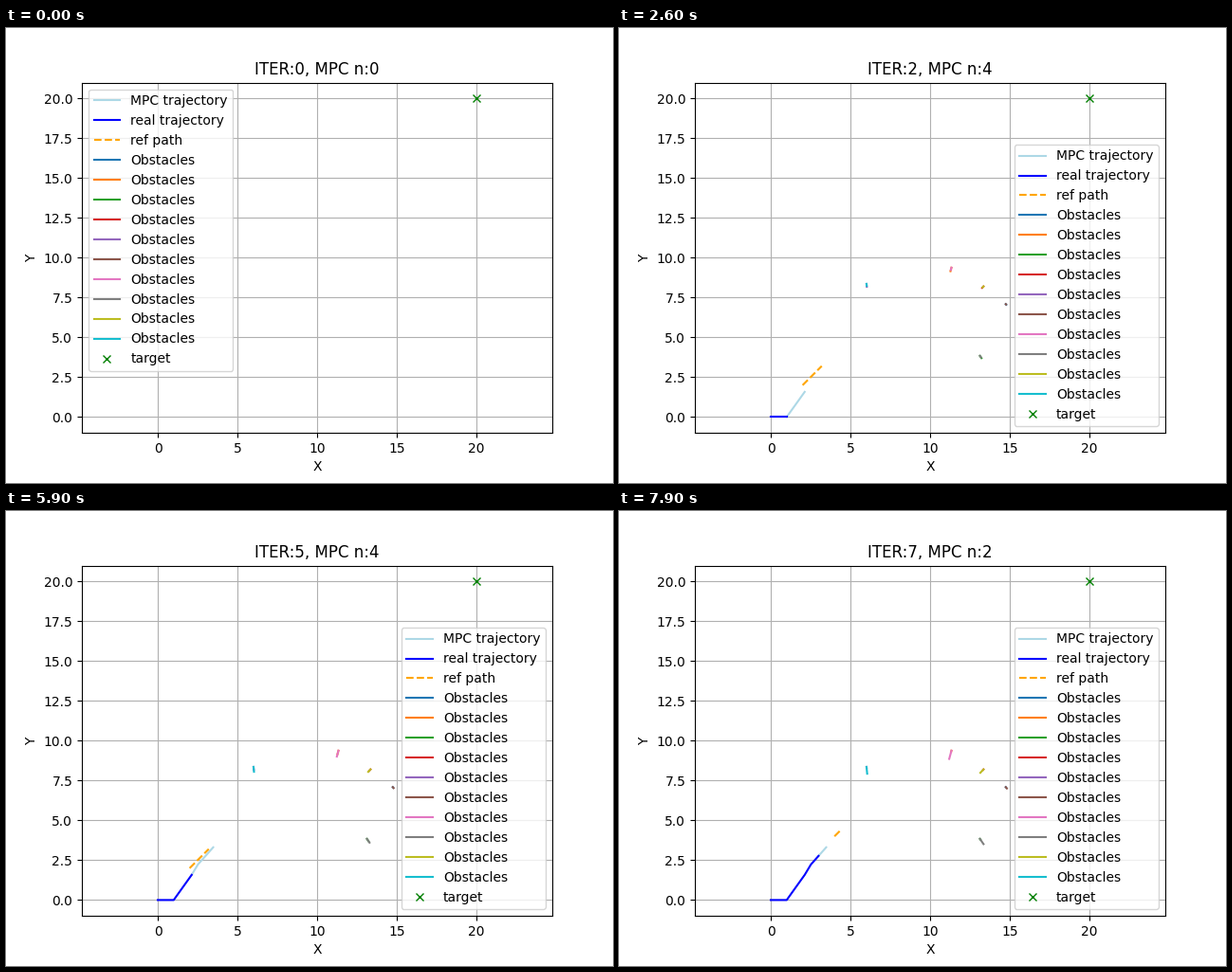
A matplotlib script for the animation above (8000 ms loop, 640 by 480 pixels).

```python
import numpy as np
import matplotlib.pyplot as plt
from matplotlib.animation import FuncAnimation

FRAMES, STEP_MS = 80, 100
HORIZON = 11                     # frames per iteration
SPAN = 496 / 16.8                # x range that gives equal axis scales

# start x, start y, and drift per iteration
OBSTACLES = [(14.75, 7.09, .010, -.012),
             (11.34, 9.38, -.020, -.074),
             (13.13, 3.84, .032, -.047),
             (13.35, 8.20, -.028, -.030),
             (6.01, 8.36, .006, -.061)]

fig, ax = plt.subplots(figsize=(6.4, 4.8), dpi=100)


def drive(k):
    """Robot position after k iterations, along a few waypoints."""
    turns = [0, 2, 5, 6, 18]
    return (np.interp(k, turns, [0, 1.0, 2.13, 2.52, 8.28]),
            np.interp(k, turns, [0, 0, 1.58, 2.23, 8.71]))


def reference(it, n):
    """Diagonal path from the next waypoint, one every two units."""
    first = 2 * (np.mean(drive(it)) // 2 + 1)
    return first + .4 * np.arange(n)


def draw(frame):
    it, n = divmod(frame, HORIZON)
    ax.cla()
    ax.plot(*drive(it + np.arange(n)), color="lightblue", label="MPC trajectory")
    ax.plot(*drive(np.arange(it + 1)), color="blue", label="real trajectory")
    ref = reference(it, n)
    ax.plot(ref, ref, "--", color="orange", label="ref path")
    for count in (n, it + 1):    # planned, then travelled
        k = np.arange(count)
        for x, y, dx, dy in OBSTACLES:
            ax.plot(x + dx * k, y + dy * k, label="Obstacles")
    ax.plot(20, 20, "gx", label="target")
    # the tiny offset settles how half-pixel tick labels round
    ax.set_xlim(10 - SPAN / 2 - 1e-7, 10 + SPAN / 2 - 1e-7)
    ax.set_ylim(-1, 21)
    ax.set_xlabel("X")
    ax.set_ylabel("Y")
    ax.set_title(f"ITER:{it}, MPC n:{n}")
    ax.grid(True)
    ax.legend(loc="best")
    return []


anim = FuncAnimation(fig, draw, frames=FRAMES, interval=STEP_MS,
                     repeat=True, repeat_delay=0, blit=False)
plt.show()
```
